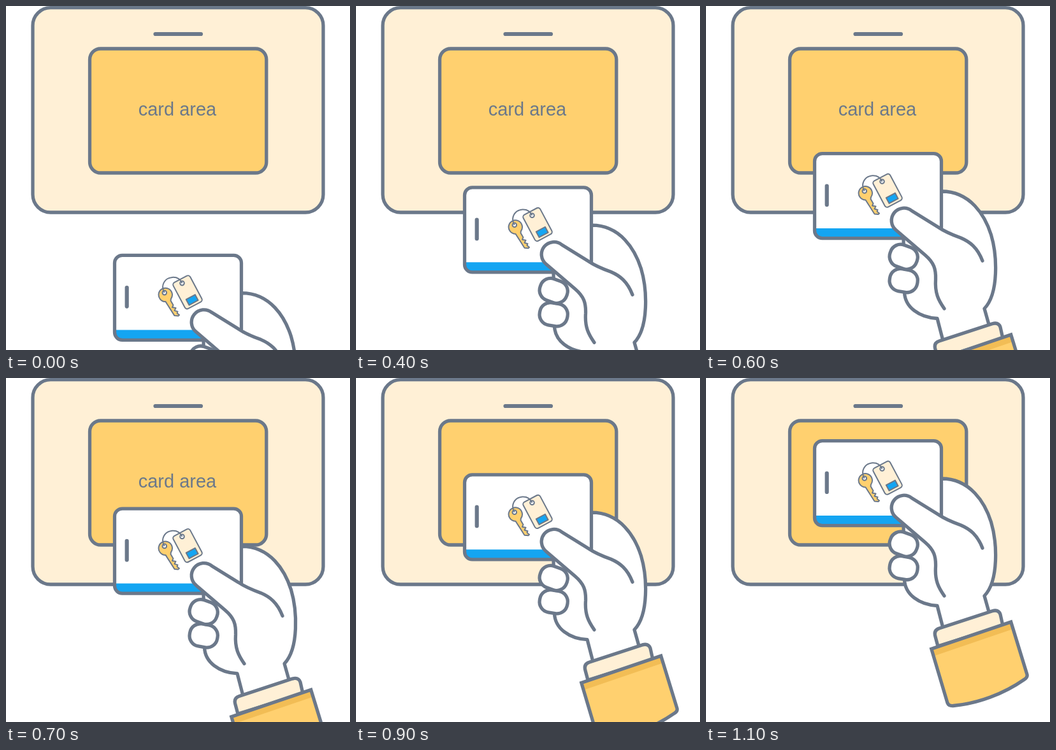
Write an HTML page that moves like this. It is 540 by 540 pixels and loops after 2.1 s.

```html
<!DOCTYPE html>
<html lang="en">
<head>
<meta charset="utf-8">
<title>Card reader</title>
<style>
  html, body { margin: 0; width: 100%; height: 100%; overflow: hidden; background: #fff; }
  svg { display: block; width: 100vw; height: 100vh; }
  .line { stroke: #6b788a; stroke-width: 5.3; stroke-linecap: round; stroke-linejoin: round; }
  .thin { stroke: #6b788a; stroke-width: 2; stroke-linejoin: round; }
  .slot { stroke-width: 6.2; }
  .sharp { stroke-linejoin: miter; }
  .cream { fill: #fff0d6; }
  .gold { fill: #ffd06f; }
  .shade { fill: #f2bd55; }
  .white { fill: #fff; }
  .blue { fill: #14a5f2; }
  .open { fill: none; }
  text { font: 29px "Liberation Sans", Arial, sans-serif; fill: #6b788a; text-anchor: middle; }
</style>
</head>
<body>
<svg viewBox="0 0 540 540">
  <!-- reader -->
  <rect class="line cream" x="42" y="2.7" width="456" height="321.3" rx="28"/>
  <path class="line slot" d="M234.5 44H306"/>
  <rect class="line gold" x="131.5" y="67" width="277.3" height="195" rx="17"/>
  <text x="269" y="171.5">card area</text>

  <g id="mover">
    <!-- palm -->
    <path class="line white" d="M370 158C415 158 438 196 447.5 226C457 258 460 318 437 342L446 374L373 396L363 357.5C335 356 312 340 311.5 316L310 233Z"/>

    <!-- card -->
    <rect class="white" x="170.5" y="98.7" width="199" height="133" rx="12"/>
    <path class="blue" d="M171 216H369V231H180Q171 231 171 222Z"/>
    <rect class="line open" x="170.5" y="98.7" width="199" height="133" rx="12"/>
    <path class="line slot" d="M189.7 149.5V179"/>

    <!-- key and tag -->
    <g transform="translate(285 156.7) rotate(-28)">
      <rect class="thin cream" x="-15" y="-23.2" width="30" height="46.4" rx="4"/>
      <rect class="thin blue" x="-7.3" y="9" width="16" height="10"/>
    </g>
    <path class="thin gold" d="M250.5 171.5A10.7 10.7 0 1 1 259 167L258.5 170L262.5 177L261 180.5L266.5 181.5L264.5 185.5L269.5 187L268.5 189.5L272 192.5L270.5 194L264.5 193.5Z"/>
    <circle class="thin white" cx="248.8" cy="157.5" r="3.3"/>
    <circle class="thin white" cx="276.5" cy="142.5" r="3.3"/>
    <path class="thin open" d="M248.8 157.5C242 146 249 134.5 261 133.3Q272 132.5 276.5 142.5"/>

    <!-- fingers and thumb -->
    <rect class="line white" x="288.2" y="280.3" width="44" height="35.5" rx="16.5" transform="rotate(10 310.2 298)"/>
    <rect class="line white" x="288.2" y="243" width="44" height="35.5" rx="16.5" transform="rotate(20 310.2 260.7)"/>
    <path class="line white" d="M434 267C426 246 414 237 400 231C386 226 376 222 365 214.5L323 188.5A19.4 19.4 0 0 0 298.5 219L344 258C358 270 361 280 360.5 296C359 318 365 329 374 342"/>

    <!-- sleeve -->
    <path class="line cream" d="M364 421L360 406Q357 396 366 393L449.5 365.7Q459 363 462 371L466 389Z"/>
    <path class="gold" d="M353.8 425.3L478.7 383L504 465.5Q505 470 500 473C467 496 427 511 388 514.5Q381 515 379 510Z"/>
    <path class="shade" d="M353.8 425.3L478.7 383L482 394L357.5 436.5Z"/>
    <path class="line open sharp" d="M353.8 425.3L478.7 383L504 465.5Q505 470 500 473C467 496 427 511 388 514.5Q381 515 379 510Z"/>
  </g>
</svg>
<script>
  const LOOP = 2100, STEP = 100, LAST_STEP = 11, RISE = 26.6;
  const mover = document.getElementById("mover");

  // The card rises in equal steps, then rests on the reader.
  function draw() {
    const step = Math.min(LAST_STEP, Math.floor(performance.now() % LOOP / STEP));
    mover.setAttribute("transform", `translate(0 ${(LAST_STEP - step) * RISE})`);
    requestAnimationFrame(draw);
  }
  draw();
</script>
</body>
</html>
```
